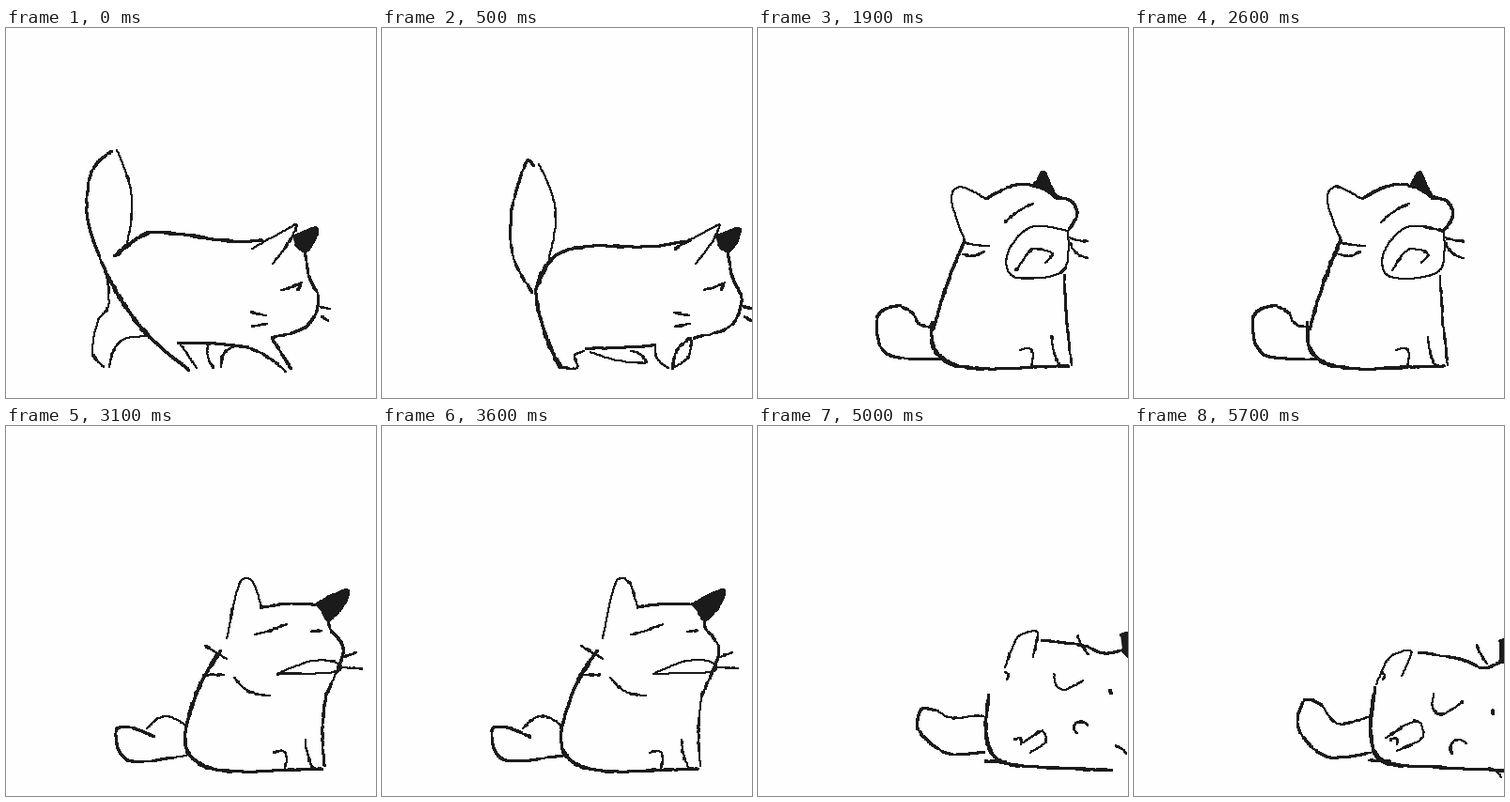
An HTML page with a canvas that plays this animation: 394 px wide and 394 px high, repeating every 5.8 s.

```html
<!DOCTYPE html>
<html lang="en">
<head>
<meta charset="utf-8">
<title>Cat walks, sits, yawns and lies down</title>
<style>
html, body { margin: 0; width: 100%; height: 100%; overflow: hidden; background: #fefefe; }
canvas { display: block; }
</style>
</head>
<body>
<canvas id="stage" width="394" height="394"></canvas>
<script>
const SIZE = 394, LOOP = 5800, STEP = 100, SAMPLES = 28;
const ctx = document.getElementById('stage').getContext('2d');

const lerp = (a, b, k) => a + (b - a) * k;
const noise = n => { const v = Math.sin(n * 12.9898) * 43758.5453; return v - Math.floor(v); };
const trace = point => Array.from({ length: SAMPLES + 1 }, (_, n) => point(n / SAMPLES));

// A line that bulges to its left-hand side.
function bow(x0, y0, x1, y1, bulge = 0) {
  const dx = x1 - x0, dy = y1 - y0, length = Math.hypot(dx, dy);
  return trace(u => {
    const side = bulge * Math.sin(Math.PI * u) / length;
    return [x0 + dx * u + dy * side, y0 + dy * u - dx * side];
  });
}

// Part of an ellipse, angles in degrees clockwise from the right.
function oval(cx, cy, rx, ry, from = 0, to = 360) {
  return trace(u => {
    const a = lerp(from, to, u) * Math.PI / 180;
    return [cx + rx * Math.cos(a), cy + ry * Math.sin(a)];
  });
}

// A smooth curve through a few points.
function curve(...xy) {
  const last = xy.length / 2 - 1;
  const at = (i, d) => xy[2 * Math.max(0, Math.min(last, i)) + d];
  return trace(u => {
    const i = Math.min(last - 1, Math.floor(u * last)), f = u * last - i;
    return [0, 1].map(d => {
      const [p, q, r, s] = [-1, 0, 1, 2].map(o => at(i + o, d));
      return q + f / 2 * (r - p + f * (2 * p - 5 * q + 4 * r - s + f * (3 * (q - r) + s - p)));
    });
  });
}

function move(parts, dx, dy) {
  for (const name in parts) parts[name] = parts[name].map(([x, y]) => [x + dx, y + dy]);
  return parts;
}

const walkingHead = (dx, dy) => move({
  ear: curve(262, 235, 303, 212, 309, 212, 300, 230, 284, 251),
  dark: curve(305, 222, 328, 213, 331, 220, 320, 238, 308, 231),
  face: curve(318, 236, 323, 265, 333, 290, 320, 318, 283, 330),
  eye: bow(293, 279, 315, 271, -1),
  lid: bow(314, 272, 311, 279),
  whiskerA: bow(335, 297, 345, 299),
  whiskerB: bow(336, 307, 343, 312),
  cheekA: bow(261, 303, 277, 306),
  cheekB: bow(262, 318, 278, 315)
}, dx, dy);

const seat = (dx, dy) => move({
  rump: curve(190, 318, 192, 345, 212, 362, 250, 367, 300, 365),
  front1: bow(318, 333, 326, 364, -2),
  foot: curve(284, 347, 294, 345, 298, 352, 296, 364),
  ground: bow(300, 365, 336, 364)
}, dx, dy);

const walk = {
  ...walkingHead(0, 0),
  tailL: curve(112, 131, 91, 154, 87, 205, 108, 264),
  tailR: bow(118, 130, 129, 229, 10),
  back: curve(116, 243, 145, 221, 170, 218, 240, 227, 273, 226),
  rump: bow(108, 264, 195, 364, -9),
  hind: curve(108, 265, 109, 296, 98, 312, 92, 345, 104, 361),
  hind2: bow(148, 328, 110, 361, -13),
  belly: bow(184, 336, 258, 340, 2),
  front1: bow(250, 338, 298, 366, 4),
  front2: bow(303, 362, 283, 330),
  leg1: bow(186, 337, 203, 362),
  leg2: bow(221, 362, 215, 338, 3),
  leg3: bow(246, 338, 229, 361, -6)
};

const stop = {
  ...walkingHead(50, 0),
  tailL: curve(161, 146, 153, 144, 138, 195, 140, 245, 160, 281),
  tailR: bow(167, 145, 178, 244, 12),
  back: curve(166, 272, 185, 242, 225, 232, 280, 233, 325, 227),
  rump: curve(180, 246, 164, 280, 176, 332, 190, 361),
  hind: curve(190, 361, 208, 362, 205, 349, 215, 344),
  belly: bow(218, 341, 290, 338, -1),
  front1: bow(291, 338, 305, 362, -5),
  front2: bow(310, 362, 329, 330, 6),
  front3: bow(329, 330, 312, 361, 7),
  leg1: bow(222, 345, 280, 357, -3),
  leg2: bow(282, 356, 265, 344, -3)
};

const sit = {
  ...seat(0, 0),
  tailL: curve(157, 280, 138, 281, 131, 311, 150, 344, 195, 353),
  tailR: bow(161, 288, 188, 318, -4),
  back: curve(190, 320, 210, 276, 243, 232, 278, 208),
  ear: curve(258, 218, 300, 192, 314, 187, 307, 208, 289, 233),
  headtop: bow(308, 206, 328, 210, 1),
  dark: curve(329, 208, 345, 203, 361, 198, 352, 219, 344, 222),
  face: curve(344, 222, 343, 248, 354, 278, 331, 303),
  eye: bow(294, 252, 323, 245, -2),
  whiskerA: bow(352, 280, 362, 280),
  whiskerB: bow(348, 289, 359, 294),
  cheekA: bow(271, 280, 283, 277),
  cheekB: bow(261, 297, 282, 290, -1),
  mouth: oval(326, 292, 6, 2.5),
  front2: bow(335, 362, 331, 303, 2)
};

const yawn = {
  ...seat(-5, -4),
  tailL: curve(166, 304, 148, 296, 127, 308, 137, 347, 194, 353),
  tailR: bow(166, 305, 185, 318, -5),
  back: bow(187, 320, 220, 226, 2),
  ear: curve(220, 226, 206, 185, 215, 169, 243, 182),
  headtop: bow(243, 182, 322, 181, 15),
  dark: curve(295, 166, 304, 153, 311, 166, 318, 181, 306, 172),
  face: curve(318, 181, 333, 184, 340, 199, 331, 215),
  eye: bow(263, 207, 293, 187, 2),
  whiskerA: bow(331, 223, 351, 227, -1),
  whiskerB: bow(331, 227, 351, 245, -4),
  cheekA: bow(219, 228, 246, 232, -1),
  cheekB: bow(218, 241, 241, 238, -3),
  mouth: curve(330, 216, 290, 212, 266, 240, 273, 265, 325, 259, 330, 216),
  tongue: curve(275, 258, 292, 236, 313, 240, 306, 250),
  front2: bow(334, 359, 326, 264, 1)
};

const rest = {
  ...seat(1, 1),
  tailL: curve(158, 331, 133, 321, 117, 325, 130, 356, 192, 351),
  tailR: bow(150, 322, 190, 318, 11),
  back: bow(192, 320, 229, 239, 5),
  ear: curve(235, 226, 247, 172, 256, 162, 265, 170, 272, 194),
  headtop: bow(272, 193, 328, 190, 2),
  dark: curve(329, 190, 362, 174, 362, 187, 345, 207, 337, 199),
  face: curve(344, 207, 345, 216, 359, 240, 341, 286),
  eye: bow(265, 222, 299, 211, -1),
  nose: bow(325, 219, 336, 218),
  whiskerA: bow(360, 246, 373, 241),
  whiskerB: bow(358, 257, 379, 258),
  cheekA: bow(212, 234, 235, 248),
  cheekB: bow(210, 265, 232, 265),
  chin: bow(243, 268, 281, 287, -6),
  mouth: curve(289, 264, 325, 250, 352, 252, 350, 262, 289, 264),
  front2: bow(339, 362, 341, 285, 3)
};

const lean = {
  tailL: curve(146, 320, 147, 341, 182, 337, 204, 344),
  tailR: bow(146, 320, 206, 305, 23),
  back: bow(207, 318, 278, 200, 4),
  rump: curve(207, 315, 218, 347, 260, 364, 318, 366),
  ear: curve(280, 198, 292, 155, 300, 148, 307, 152, 319, 181),
  headtop: bow(303, 185, 380, 204, 10),
  dark: curve(376, 200, 396, 197, 396, 227, 386, 209),
  face: curve(389, 215, 392, 235, 371, 280),
  eye: bow(303, 192, 334, 195, 1),
  nose: bow(348, 210, 358, 212),
  whiskerA: bow(375, 212, 386, 222),
  whiskerB: bow(390, 262, 396, 267),
  cheekA: bow(258, 191, 272, 212, -2),
  cheekB: bow(248, 226, 277, 226),
  mouth: oval(335, 255, 6, 4),
  front1: bow(290, 307, 291, 352, 3),
  front2: bow(310, 366, 364, 288, -9),
  front3: bow(315, 318, 301, 352, -3),
  foot: bow(262, 337, 260, 364, 12),
  paw: oval(313, 354, 12, 7),
  ground: bow(216, 360, 240, 361)
};

const lie = {
  tailL: curve(200, 297, 182, 292, 175, 322, 205, 352, 252, 348),
  tailR: curve(200, 297, 217, 317, 250, 310),
  rump: curve(257, 278, 252, 325, 265, 357, 320, 363, 394, 367),
  ear: curve(258, 275, 272, 247, 295, 240, 285, 266),
  pad: bow(263, 262, 265, 270, 3),
  headtop: curve(303, 241, 350, 249, 372, 258, 394, 249),
  dark: curve(389, 229, 396, 229, 396, 250, 389, 250),
  eye: curve(319, 285, 318, 300, 328, 307, 350, 294),
  nose: bow(382, 302, 382, 307),
  cheekA: bow(365, 233, 376, 253, -1),
  mouth: oval(346, 343, 9, 9, 140, 330),
  paw: curve(268, 332, 300, 314, 307, 332, 280, 346),
  toe: bow(273, 334, 280, 339, 5),
  whiskerB: bow(378, 364, 391, 374, 2),
  ground: bow(250, 356, 272, 357)
};

// Start time, pose, and how strongly the move that follows slows down.
const keys = [
  [0, walk, 1], [500, stop, 3.2], [1200, sit, 1], [1300, sit, 1.5], [1900, yawn, 1], [2600, yawn, 1.5],
  [3000, rest, 1], [3600, rest, 1.3], [4200, lean, 1], [4400, lean, 1.6], [5400, lie, 1], [LOOP, lie, 1]
];

function poseAt(t) {
  const i = keys.findIndex(key => key[0] > t) - 1;
  const [start, a, power] = keys[i], [end, b] = keys[i + 1];
  const k = 1 - (1 - (t - start) / (end - start)) ** power;
  const pose = {};
  for (const name in { ...a, ...b }) {
    if (a[name] && b[name]) {
      pose[name] = a[name].map((p, n) => p.map((v, d) => lerp(v, b[name][n][d], k)));
    } else if (k < 0.5 ? a[name] : b[name]) {
      pose[name] = a[name] || b[name];
    }
  }
  return pose;
}

const WIDTH = { back: 3.2, rump: 3.3, belly: 3, tailL: 2.8, headtop: 2.7, face: 2.7, front2: 2.6, ground: 2.7 };

// Square stamps on whole pixels give the dry, jagged edge.
function brush(points, width, seed) {
  const rough = points.map((p, n) => p.map((v, d) => v + (noise(seed + n + 50 * d) - 0.5) * 0.8));
  for (let n = 0; n < SAMPLES; n++) {
    const [x0, y0] = rough[n], [x1, y1] = rough[n + 1];
    const size = Math.round(width + noise(seed + n + 100) - 0.5);
    const count = Math.ceil(Math.hypot(x1 - x0, y1 - y0));
    for (let s = 0; s <= count; s++) {
      const u = s / (count || 1);
      ctx.fillRect(Math.round(lerp(x0, x1, u) - size / 2), Math.round(lerp(y0, y1, u) - size / 2), size, size);
    }
  }
}

function draw(t) {
  ctx.fillStyle = '#fefefe';
  ctx.fillRect(0, 0, SIZE, SIZE);
  ctx.fillStyle = '#1b1b1b';
  let seed = t / STEP * 7;
  for (const [name, points] of Object.entries(poseAt(t))) {
    if (name === 'dark') {
      ctx.beginPath();
      points.forEach(p => ctx.lineTo(...p));
      ctx.fill();
    }
    brush(points, WIDTH[name] || 2.1, seed += 200);
  }
}

const begin = performance.now();
function frame() {
  const t = (performance.now() - begin) % LOOP;
  draw(Math.floor(t / STEP) * STEP);
  requestAnimationFrame(frame);
}
frame();
</script>
</body>
</html>
```
